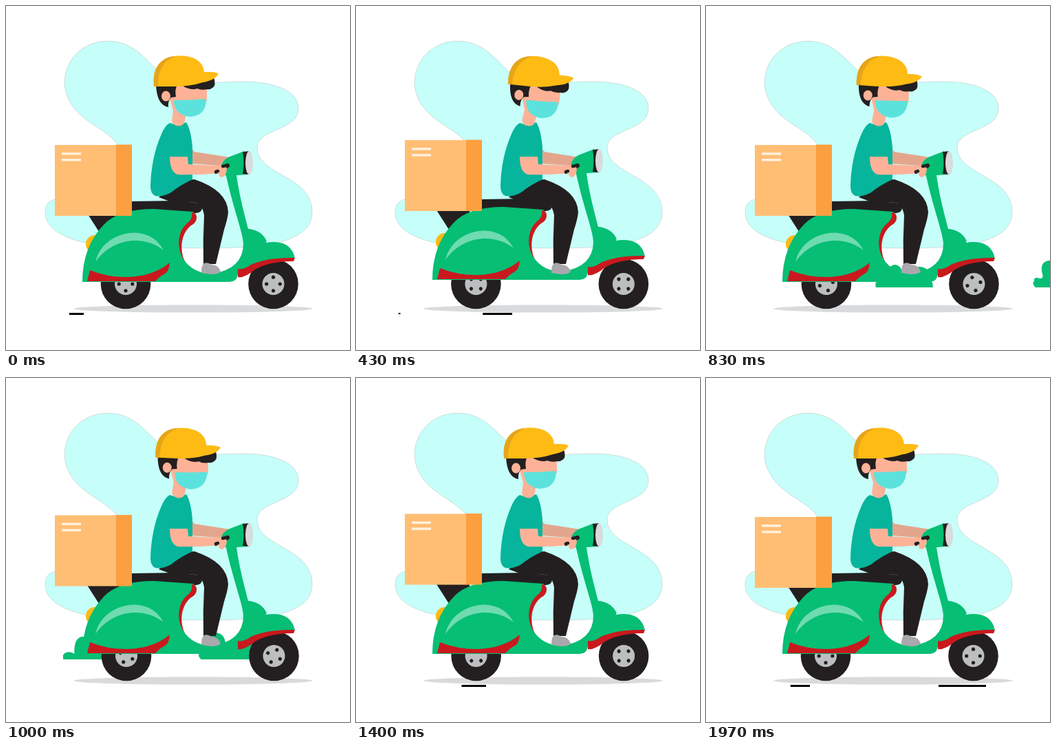
Animation of 500 by 500 pixels, one loop 2010 ms. Source, as an HTML page:

```html
<!DOCTYPE html>
<html lang="en">
<head>
<meta charset="utf-8">
<title>Scooter delivery</title>
<style>
html, body { margin: 0; width: 100%; height: 100%; overflow: hidden; background: #fff; }
svg { display: block; width: 100vw; height: 100vh; }
</style>
</head>
<body>
<svg viewBox="0 0 500 500">
  <defs>
    <g id="hub">
      <circle r="16" fill="#bcbec0"/>
      <g fill="#231f20">
        <circle cy="-9.8" r="2.6"/><circle cx="9.8" r="2.6"/>
        <circle cy="9.8" r="2.6"/><circle cx="-9.8" r="2.6"/>
      </g>
    </g>
  </defs>

  <path fill="#c6fff9" stroke="#c3cfcd" stroke-width=".7" d="M85 115C84 78 112 51 148 51C185 51 203 78 222 95C250 119 295 110 345 110C388 110 425 122 425 149C425 182 365 178 365 206C365 246 445 246 445 299C445 342 385 351 300 352L190 351C125 351 57 338 57 300C57 285 66 281 80 279C120 270 170 240 164 205C150 175 92 169 85 115Z"/>
  <ellipse cx="272" cy="440" rx="174" ry="5.6" fill="#d9dadc"/>
  <path id="dashes" fill="#000"/>

  <g fill="#06be74">
    <path id="bushA" d="M0 409Q-2 401 4 399Q11 397 16 401Q15 377 28 376Q41 378 38 397Q44 390 50 396Q52 379 65 379Q80 381 79 398Q83 400 83 409Z"/>
    <path id="bushB" d="M4 409Q-2 403 2 400Q1 393 10 396Q16 396 14 390Q9 371 25 370Q37 371 39 383Q42 390 51 388Q55 385 57 376Q64 362 78 363Q95 366 94 388Q104 386 105 396Q115 400 112 409Z"/>
  </g>

  <g class="wheel">
    <circle cx="174" cy="404" r="36.3" fill="#231f20"/>
    <use href="#hub" class="hub" data-x="174"/>
  </g>
  <g class="wheel">
    <circle cx="388.5" cy="404" r="36.3" fill="#231f20"/>
    <use href="#hub" class="hub" data-x="388.5"/>
  </g>

  <path fill="#e3a68d" d="M268 205L274 212L326 220L322 233L270 229Z"/>

  <g id="bike">
    <path fill="#231f20" d="M114 295L160 290L172 318L137 331Z"/>
    <circle cx="129" cy="346" r="13" fill="#fdb913"/>
    <path fill="#231f20" d="M180 284L245 283L284 287Q288 300 276 301L180 300Z"/>
    <path fill="#06be74" d="M111 401Q111 350 142 318Q163 295 215 295L272 299Q279 306 270 316C252 329 249 352 258 368Q272 389 300 389Q345 382 345 345C344 328 332 300 320 247L312 236Q314 222 328 218L346 211L350 245L335 246C340 280 346 300 352 324Q372 326 378 344Q414 338 420 367Q375 371 338 388L336 393Q335 401 322 401Z"/>
    <path fill="#06be74" d="M352 324Q372 326 379 342L350 362Z"/>
    <path fill="#6fdbb0" d="M130 372C136 345 162 329 188 329.500Q216 331 229 355C205 335 158 333 130 372Z"/>
    <path fill="#c9191e" d="M118 400L122 384Q146 394 176 394Q214 393 238 373Q237 386 231 389Q222 394 217 400Z"/>
    <path fill="#c9191e" d="M270 300Q277 300 277 308Q277 315 269 319C254 331 252 354 260 371C247 354 249 329 262 317Q272 310 270 300Z"/>
    <path fill="#c9191e" d="M337 382Q345 384 356 376Q380 365 420 366L418 371Q382 371 362 383Q346 396 337 394Z"/>
    <path fill="#231f20" d="M344 212L353 211V245L344 244Q347 228 344 212Z"/>
    <ellipse cx="353.500" cy="228" rx="5.500" ry="17" fill="#d9dadc"/>
  </g>

  <path fill="#231f20" d="M222 278Q250 252 274 252Q322 268 323 300Q322 310 317 325L305 375L287 375Q286 340 288 304Q285 288 276 286L238 284Z"/>
  <path fill="#aaa8ac" d="M284 388Q284 376 288 374Q294 372 298 376Q308 375 312 386Q309 390 298 390Z"/>

  <g id="box">
    <path fill="#ffbe74" d="M71 202H161V305H71Z"/>
    <path fill="#fc9f40" d="M160 201.500H183V305H160Z"/>
    <path fill="#fff0dc" d="M81 213H109V216.500H81ZM81 222H109V225.500H81Z"/>
  </g>

  <path fill="#06b59b" d="M238 170Q250 175 262 169Q269 180 271 206V252Q252 261 240 271Q228 278 217 276Q210 273 210 262Q211 220 226 186Q231 174 238 170Z"/>
  <path d="M305 241L322 232" stroke="#231f20" stroke-width="6" stroke-linecap="round"/>
  <path fill="#fdb297" d="M238 219H264L265 230L305 232Q320 229 321 237Q320 249 313 249Q309 248 309 243Q275 246 250 245Q238 242 238 219Z"/>
  <path d="M305 241L308 240M315 233L322 231.500" stroke="#231f20" stroke-width="4.500" stroke-linecap="round"/>

  <g id="head">
    <path fill="#fdb297" d="M237 132L246 110H292V138L261 160L260 167Q259 174 251 174.500Q242 174 241 167L243 152Z"/>
    <path fill="#231f20" d="M218 114H249Q245 122 247 132L240 133Q235 138 236 147Q219 144 218 114Z"/>
    <path fill="#231f20" d="M258 112L302 104Q306 116 300 119Q296 122 292 121Q284 123 278 120Q270 123 258 117Z"/>
    <ellipse cx="232.500" cy="131" rx="6.500" ry="7.500" fill="#fdb297"/>
    <path fill="#5ce2dc" d="M244 137Q268 137 291 135Q291 160 267 161Q244 158 244 137Z"/>
    <path fill="#fdbb14" d="M215 117Q212 88 231 77Q243 71 260 72.500Q286 76 288 96Q301 95 309 98Q304 108 286 111Q268 117 243 117Z"/>
    <path fill="#e5a51a" d="M215 117Q212 88 231 77Q238 73 246 73Q220 83 221 117Z"/>
  </g>
</svg>
<script>
const LOOP = 2010, LAST = 59, TURN = Math.PI * 2;
const $ = id => document.getElementById(id);
const move = (el, x, y) => el.setAttribute('transform', `translate(${x} ${y})`);
const clamp = v => Math.max(0, Math.min(1, v));
const smooth = v => { v = clamp(v); return v * v * (3 - 2 * v); };

// Linear interpolation through [step, value] points
function track(points, n) {
  const i = Math.max(1, points.findIndex(p => p[0] >= n));
  const [a, va] = points[i - 1], [b, vb] = points[i];
  return va + (vb - va) * clamp((n - a) / (b - a));
}

const spin = [[0, 0], [13, 135], [19, 195], [25, 255], [36, 345], [49, 474], [59, 540]];
const dashStarts = [-11, -2, 5, 33, 40, 49, 56];
const dashLeft = [[3, 338], [11, 92], [12, 68], [13, 62], [18, 61.5]];
const dashRight = [[3, 407], [8, 227], [11, 113], [12, 86], [13, 72], [14, 66], [16, 63], [18, 62.5]];

function dashPath(n) {
  return dashStarts.map(s => n - s).filter(k => k > 2 && k < 18).map(k => {
    const bottom = k > 14 ? 448 : 449;
    return `M${track(dashLeft, k)} 446H${track(dashRight, k)}V${bottom}H${track(dashLeft, k)}Z`;
  }).join('');
}

function draw(n) {
  const bump = end => n > 1 && n < end ? (1 - Math.cos(TURN * (n - 1) / 24)) / 2 : 0;
  move($('bike'), 0, -3 * bump(25));
  move($('box'), 0, -7 * bump(49));

  const tilt = 6.2 * (n < 12 ? smooth(n / 12) : 1 - smooth((n - 12) / 32));
  $('head').setAttribute('transform', `rotate(${tilt} 250 170)`);

  const shift = Math.sin(Math.PI * n / 60) ** 2;
  document.querySelectorAll('.wheel').forEach(w => move(w, shift, 0));
  document.querySelectorAll('.hub').forEach(h =>
    h.setAttribute('transform', `translate(${h.dataset.x} 404) rotate(${track(spin, n)})`));

  move($('bushA'), 443 - 32.7 * (n - 19), 0);
  move($('bushB'), 475 - 39.1 * (n - 25), 0);
  $('dashes').setAttribute('d', dashPath(n));
}

const start = performance.now();
function tick() {
  const t = (performance.now() - start) % LOOP;
  draw(Math.min(LAST, Math.floor((t + 4) / 33.34)));
  requestAnimationFrame(tick);
}
tick();
</script>
</body>
</html>
```
